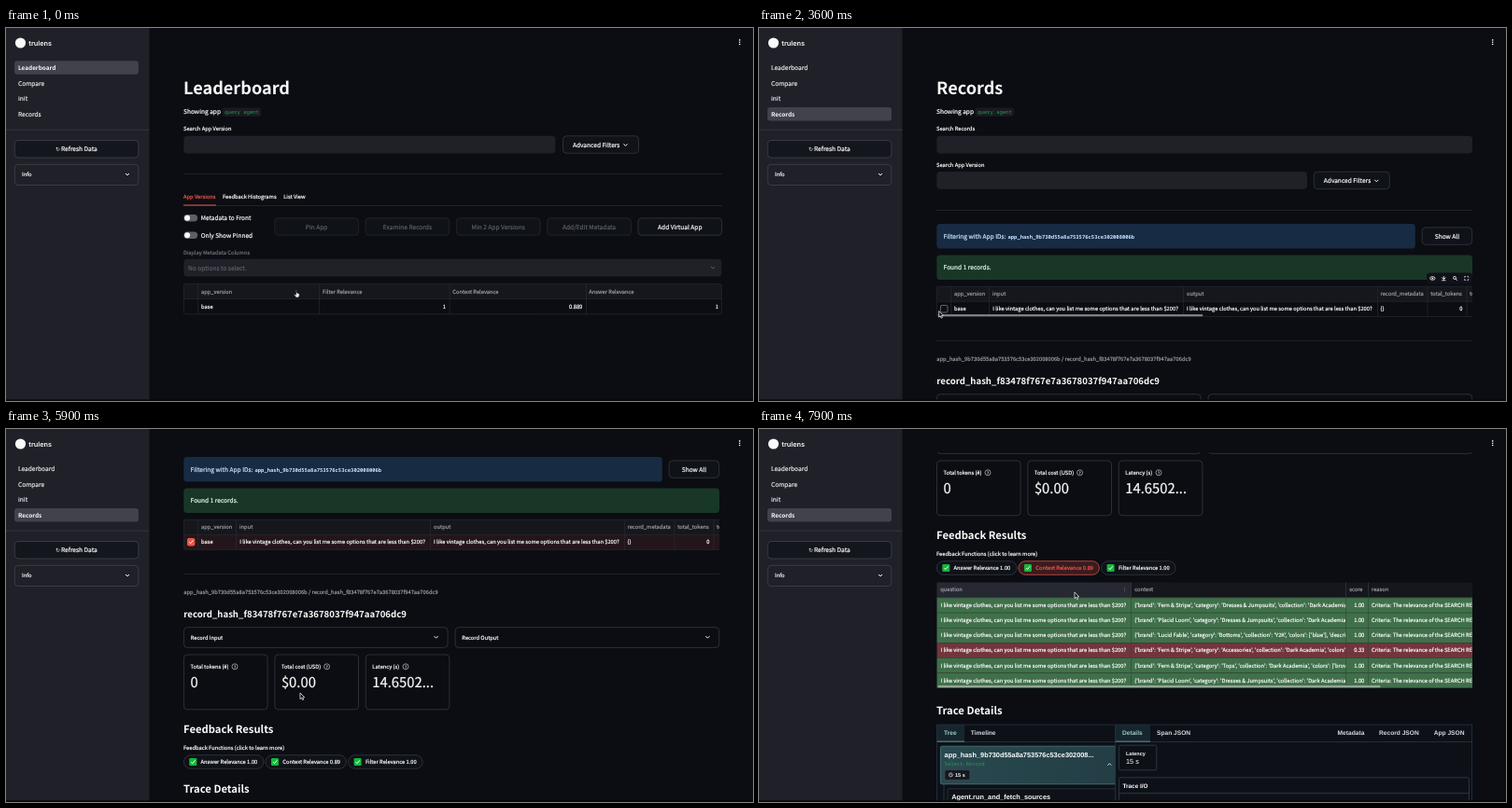
These frames come from a looping animation (800x400 px, 8 s). An HTML page with a canvas:

```html
<!DOCTYPE html>
<html lang="en">
<head>
<meta charset="utf-8">
<title>Records dashboard</title>
<style>
  html, body { margin: 0; width: 100%; height: 100%; overflow: hidden; background: #0b0d12; }
  canvas { display: block; width: 800px; height: 400px; }
</style>
</head>
<body>
<canvas id="stage"></canvas>
<script>
const LOOP = 8000, STEP = 100;
const UNIT = 0.46;              // stage pixels per interface pixel
const SANS = '"Noto Sans CJK JP", "Noto Sans CJK SC", "Noto Sans CJK", "Open Sans", sans-serif';
const SANS_FIT = UNIT / 1.117;  // this family draws its Latin letters large
const MONO = '"Noto Sans Mono", "Liberation Mono", monospace';
const ARIAL = '"Liberation Sans", Arial, sans-serif';

const BG = '#0b0d12', PANEL = '#1f2028', INK = '#fafafa', MUTED = '#989aa2', DIM = '#5c5e66';
const BUTTON = '#0f1218', LINE = '#2a2c34', EDGE = '#3c3e47', RED = '#e8584b', GREEN = '#2c9a4b', TEAL = '#9cc9c6';

const QUESTION = 'I like vintage clothes, can you list me some options that are less than $200?';
const APP_HASH = 'app_hash_9b730d55a8a753576c53ce302008006b';
const RECORD_HASH = 'record_hash_f83478f767e7a3678037f947aa706dc9';

const canvas = document.getElementById('stage');
const ctx = canvas.getContext('2d');
const ratio = window.devicePixelRatio || 1;
canvas.width = 800 * ratio;
canvas.height = 400 * ratio;

// ---- drawing helpers ----
function write(s, x, y, px, family, color, weight, align) {
  ctx.font = `${weight} ${px}px ${family}`;
  ctx.fillStyle = color;
  ctx.textAlign = align;
  ctx.fillText(s, x, y);
}
function text(s, x, y, size = 14, color = INK, weight = 400, align = 'left') {
  write(s, x, y, size * SANS_FIT, SANS, color, weight, align);
  if (weight > 400) return;
  // a hairline outline gives the regular weight its heavier screen look
  ctx.strokeStyle = color;
  ctx.lineWidth = 0.2;
  ctx.strokeText(s, x, y);
}
const mono = (s, x, y, color = GREEN, weight = 400) =>
  write(s, x, y, 12 * UNIT, MONO, color, weight, 'left');
const arial = (s, x, y, size, color = INK, weight = 700) =>
  write(s, x, y, size * UNIT, ARIAL, color, weight, 'left');

function rect(x, y, w, h, color) {
  ctx.fillStyle = color;
  ctx.fillRect(x, y, w, h);
}
function box(x, y, w, h, r, fill, edge) {
  ctx.beginPath();
  ctx.roundRect(x, y, w, h, r);
  if (fill) { ctx.fillStyle = fill; ctx.fill(); }
  if (edge) { ctx.strokeStyle = edge; ctx.lineWidth = 0.7; ctx.stroke(); }
}
function path(points, color, width = 1) {
  ctx.beginPath();
  points.forEach(([x, y], i) => i ? ctx.lineTo(x, y) : ctx.moveTo(x, y));
  ctx.strokeStyle = color;
  ctx.lineWidth = width;
  ctx.stroke();
}
function dot(x, y, r, color) {
  ctx.beginPath();
  ctx.arc(x, y, r, 0, 7);
  ctx.fillStyle = color;
  ctx.fill();
}
function ring(x, y, r, color, width = 0.8) {
  ctx.beginPath();
  ctx.arc(x, y, r, 0, 7);
  ctx.strokeStyle = color;
  ctx.lineWidth = width;
  ctx.stroke();
}
function clipped(x, y, w, h, draw) {
  ctx.save();
  ctx.beginPath();
  ctx.rect(x, y, w, h);
  ctx.clip();
  draw();
  ctx.restore();
}
const rule = (y, right = 764) => rect(190, y - 0.35, right - 190, 0.7, LINE);
const chevron = (x, y, color = INK, dir = 1) =>
  path([[x - 2, y - dir], [x, y + dir], [x + 2, y - dir]], color, 1);
const kebab = (x, y, gap, r, color) => [-gap, 0, gap].forEach(d => dot(x, y + d, r, color));
const tick = (x, y, color) => path([[x - 2, y], [x - 0.6, y + 1.6], [x + 2.2, y - 1.8]], color, 1);

function checkbox(x, y, state) {
  if (state === 'empty') return box(x - 3.8, y - 3.8, 7.6, 7.6, 1.6, null, '#8a8c94');
  box(x - 4.2, y - 4.2, 8.4, 8.4, 1.8, state === 'all' ? '#c8cad0' : RED);
  tick(x, y, state === 'all' ? '#24262e' : INK);
}
function button(label, x, y, w, h = 18.5, on = true) {
  box(x, y, w, h, 3.7, BUTTON, on ? EDGE : LINE);
  text(label, x + w / 2, y + h / 2 + 2.6, 16, on ? INK : DIM, 400, 'center');
}
function advancedFilters(x, y) {
  box(x, y, 81, 18.5, 3.7, BUTTON, EDGE);
  text('Advanced Filters', x + 10.5, y + 12, 16);
  chevron(x + 67, y + 9.6);
}
const input = (x, y, w) => box(x, y, w, 18.7, 3.7, PANEL);

// ---- timing helpers ----
function along(keys, t) {
  const next = keys.findIndex(([at]) => at > t);
  if (next === 0) return keys[0].slice(1);
  if (next < 0) return keys[keys.length - 1].slice(1);
  const a = keys[next - 1], b = keys[next];
  const p = (t - a[0]) / (b[0] - a[0]);
  const e = p * p * (3 - 2 * p);
  return a.slice(1).map((v, k) => v + (b[k + 1] - v) * e);
}
const between = (t, a, b) => t >= a && t < b;

const POINTER = [
  [0, 310.5, 281], [100, 310, 281], [500, 199, 297], [1200, 199, 297], [1700, 420, 219.5],
  [1900, 424, 214], [2500, 424, 214], [3300, 195, 307], [3600, 192.7, 303.5], [3900, 198, 300],
  [4300, 198, 300], [4900, 317, 285.5], [5200, 317, 285.5], [5900, 315, 283], [6100, 315, 282],
  [6400, 319, 207], [6800, 329, 147], [7500, 330, 147], [7900, 338, 175]
];
const SCROLL = [[5000, 0], [5200, 36.5], [5700, 180], [6000, 180], [6200, 388]];

// ---- sidebar ----
function sidebar(page) {
  rect(0, 0, 153.5, 400, PANEL);
  dot(15.5, 16, 5.6, INK);
  write('trulens', 24.3, 19, 7.3, 'Inter, sans-serif', INK, 600, 'left');
  ['Leaderboard', 'Compare', 'init', 'Records'].forEach((name, i) => {
    const y = 42.4 + i * 16.6, on = name === page;
    if (on) box(9, y - 7.1, 133, 14.4, 3, '#40424c');
    text(name, 13, y + 2.7, on ? 15.6 : 16, on ? INK : '#e4e5e8', on ? 700 : 400);
  });
  rect(0, 108.8, 153.5, 0.7, '#3d3e47');
  box(9.3, 120.5, 132.5, 18.5, 3.7, '#14161d', '#464852');
  write('↻', 53, 132, 6, '"DejaVu Sans", sans-serif', INK, 400, 'left');
  text('Refresh Data', 59, 132.4, 16);
  box(9.3, 146.3, 132.5, 22.2, 3.7, PANEL, '#464852');
  text('Info', 17, 159.4);
  chevron(130, 157);
}

function pageTop(title, label) {
  text(title, 190, 71.3, 44, INK, 700);
  text('Showing app', 190, 92.2, 16);
  box(232, 85.5, 41, 9.3, 1.8, '#181b22');
  mono('query agent', 234.3, 92);
  text(label, 190, 110.2);
}

// ---- leaderboard page ----
function leaderboard(t) {
  const picked = t >= 1000;
  pageTop('Leaderboard', 'Search App Version');
  input(190.3, 115.7, 398);
  advancedFilters(596.5, 115.8);
  rule(156.3, 766.5);

  text('App Versions', 190, 183, 14, RED);
  text('Feedback Histograms', 232, 183);
  text('List View', 297.2, 183);
  rule(190.4, 766.5);
  rect(190, 189.5, 35, 1, RED);

  ['Metadata to Front', 'Only Show Pinned'].forEach((label, i) => {
    const y = 203.8 + i * 18.5;
    box(190.4, y - 3.7, 14.8, 7.4, 3.7, '#5d5f67');
    dot(194.1, y, 3, INK);
    text(label, 208.7, y + 2.6, 15.8);
  });
  ['Pin App', 'Examine Records', 'Min 2 App Versions', 'Add/Edit Metadata', 'Add Virtual App']
    .forEach((label, i) => button(label, 287.8 + i * 97.3, 203.9, 89.6, 18.3, i === 4 || (picked && i !== 2)));
  if (between(t, 1800, 2200)) {
    box(385.1, 203.9, 89.6, 18.3, 3.7, BUTTON, RED);
    text('Examine Records', 429.9, 215.7, 16, RED, 400, 'center');
  }

  text('Display Metadata Columns', 190, 242.6, 14, '#6c6e76');
  box(190.3, 247.8, 576, 18.6, 3.7, PANEL);
  text('No options to select.', 195, 259.8, 16, DIM);
  chevron(757, 257, DIM);

  rect(190.4, 274.4, 576, 16.2, '#15171d');
  rect(190.4, 290.6, 576, 16.2, picked ? '#23161a' : BG);
  box(190.4, 274.4, 576, 32.4, 2, null, LINE);
  rect(190.4, 290.3, 576, 0.6, LINE);
  [205.5, 335.3, 474.8, 621].forEach(x => rect(x, 274.4, 0.6, 32.4, LINE));
  ['app_version', 'Filter Relevance', 'Context Relevance', 'Answer Relevance']
    .forEach((s, i) => text(s, [209, 339, 478.3, 624.3][i], 284.6, 14, MUTED));
  text('base', 209, 300.8);
  ['1', '0.889', '1'].forEach((s, i) => text(s, [471, 617.3, 763][i], 300.8, 14, INK, 400, 'right'));
  if (picked) {
    checkbox(198.2, 282.4, 'all');
    checkbox(198.2, 298.5, 'on');
  } else if (t >= 300) {
    checkbox(198.2, 298.5, 'empty');
  }
}

// ---- records page ----
function toolbar(picked) {
  const left = picked ? 703 : 715;
  box(left, 262.6, 764 - left, 12, 3, BUTTON);
  const y = 268.4;
  if (picked) {
    path([[707.5, y - 1.6], [710.7, y + 1.6]], INK, 0.8);
    path([[710.7, y - 1.6], [707.5, y + 1.6]], INK, 0.8);
  }
  ctx.beginPath();
  ctx.ellipse(721.3, y, 2.7, 1.8, 0, 0, 7);
  ctx.strokeStyle = INK;
  ctx.lineWidth = 0.8;
  ctx.stroke();
  dot(721.3, y, 0.9, INK);
  path([[733.3, y - 2.3], [733.3, y + 0.8]], INK, 0.9);
  chevron(733.3, y + 0.2, INK);
  path([[731.2, y + 2.3], [735.4, y + 2.3]], INK, 0.8);
  ring(745, y - 0.5, 1.5, INK);
  path([[746.1, y + 0.6], [747.8, y + 2.3]], INK, 0.9);
  [[-1, -1], [1, -1], [-1, 1], [1, 1]].forEach(([sx, sy]) => {
    const cx = 757.7 + sx * 2, cy = y + sy * 2;
    path([[cx - sx * 1.3, cy], [cx, cy], [cx, cy - sy * 1.3]], INK, 0.7);
  });
}

function recordTable(t) {
  const picked = t >= 4000, hovered = between(t, 3200, 5500);
  clipped(190, 276.5, 574, 33.5, () => {
    rect(190.4, 277, 574, 16.2, '#15171d');
    if (between(t, 4600, 5500)) {
      rect(246.5, 277, 208, 16.2, '#262832');
      kebab(447.2, 285, 1.7, 0.45, MUTED);
    }
    rect(190.4, 293.2, 574, 16.2, picked ? '#23161a' : BG);
    box(190.4, 277, 580, 32.4, 2, null, LINE);
    rect(190.4, 292.9, 574, 0.6, LINE);
    [205.5, 246.4, 454.4, 662, 715.7, 757.7].forEach(x => rect(x, 277, 0.6, 32.4, LINE));
    ['app_version', 'input', 'output', 'record_metadata', 'total_tokens', 'total_cost']
      .forEach((s, i) => text(s, [209, 250, 458, 665.5, 719.2, 761][i], 287.3, 14, MUTED));
    text('base', 209, 303.4);
    text(QUESTION, 250.2, 303.4);
    text(QUESTION, 458, 303.4);
    text('{}', 665.5, 303.4);
    text('0', 753.5, 303.4, 14, INK, 400, 'right');
    if (picked || hovered) checkbox(198.2, 301.2, picked ? 'on' : 'empty');
    if (hovered) box(191.5, 306.9, 284, 2.3, 1.1, '#7d7f86');
  });
  if (hovered) toolbar(picked);
}

function pill(label, x, w, on) {
  box(x, 529.7, w, 14.6, 7.3, on ? '#3a1b1f' : BUTTON, on ? RED : EDGE);
  box(x + 6, 533, 8, 8, 1.2, '#12b83a');
  tick(x + 10, 537.1, INK);
  text(label, x + 18.3, 539.2, 14, on ? RED : INK);
}

function feedbackTable(t) {
  const items = [
    ['Fern & Stripe', 'Dresses & Jumpsuits'], ['Placid Loom', 'Dresses & Jumpsuits'],
    ['Lucid Fable', 'Bottoms', 'Y2K', 'blue'], ['Fern & Stripe', 'Accessories'],
    ['Fern & Stripe', 'Tops'], ['Placid Loom', 'Dresses & Jumpsuits']
  ];
  const columns = [190.5, 398.4, 628.4, 652.2, 764], top = 552.6, row = 16.15;
  clipped(190, top - 0.5, 574, 114.5, () => {
    rect(190.5, top, 574, row, '#15171d');
    if (t >= 7800) {
      rect(190.5, top, 208, row, '#262832');
      kebab(391.3, 560.2, 1.7, 0.45, MUTED);
    }
    ['question', 'context', 'score', 'reason'].forEach((s, i) => text(s, columns[i] + 3.8, 562.4, 14, MUTED));
    items.forEach(([brand, category, style = 'Dark Academia', color = 'brown'], i) => {
      const y = top + row * (i + 1), low = i === 3, base = y + 10.2;
      rect(190.5, y, 574, row, low ? '#72353c' : '#40704a');
      rect(190.5, y, 574, 0.6, '#2f4737');
      text(QUESTION, 194.5, base);
      clipped(columns[1], y, 230, row, () =>
        text(`{'brand': '${brand}', 'category': '${category}', 'collection': '${style}', ` +
          `'colors': ['${color}'], 'description'`, 402.2, base));
      text(low ? '0.33' : '1.00', 648.3, base, 14, INK, 400, 'right');
      text('Criteria: The relevance of the SEARCH RESULT', 656, base);
    });
    columns.slice(1, 4).forEach(x => rect(x, top, 0.6, 114, '#2f4737'));
    box(191.5, 663, 474, 2.3, 1.1, '#93a896');
  });
}

function treeItem(x, y, title, selector, time, style = {}) {
  const fill = ctx.createLinearGradient(x, y, 381, y + 40);
  fill.addColorStop(0, style.from || '#0e1218');
  fill.addColorStop(1, style.to || '#0e1218');
  box(x, y, 383 - x, 40.6, 1.5, fill, style.edge || '#2b3a45');
  arial(title, x + 4.2, y + 11.6, 16);
  mono(selector, x + 4.2, y + 20.4);
  box(x + 4.5, y + 25.2, time.length * 3 + 15, 11, 2, '#15181e', '#4a4d55');
  ring(x + 11, y + 30.7, 2, INK, 0.6);
  path([[x + 11, y + 29.4], [x + 11, y + 30.8], [x + 12, y + 31.2]], INK, 0.5);
  arial(time, x + 15.6, y + 32.7, 12);
  if (style.open) chevron(375.3, y + 19.5, '#cfd3d6', -1);
}

function trace(t) {
  const hot = between(t, 6200, 6600), frame = '#263a52';
  text('Trace Details', 190, 569.6, 27.4, INK, 700);
  rect(190.5, 580.5, 573, 300, '#0d1117');
  rect(190.5, 580.5, 29.5, 18.3, '#17262e');
  rect(381.5, 580.5, 37.5, 18.3, '#17262e');
  rect(190.5, 598.5, 573, 0.7, frame);
  rect(190.5, 598, 29.5, 1, '#5b8e91');
  rect(381.5, 598, 37.5, 1, '#5b8e91');
  ['Tree', 'Timeline', 'Details', 'Span JSON', 'Metadata', 'Record JSON', 'App JSON'].forEach((s, i) =>
    arial(s, [198, 226.8, 389, 426, 619.6, 664, 722.7][i], 591.6, 14.45, i % 2 || i > 2 ? '#d5d8dc' : TEAL));

  clipped(190.5, 599, 191.2, 290, () => {
    path([[198, 644], [198, 669], [202, 669]], '#33454f', 0.7);
    path([[205.5, 689], [205.5, 760], [209, 760]], '#33454f', 0.7);
    path([[205.5, 714.5], [209, 714.5]], '#33454f', 0.7);
    treeItem(194.4, 603.6, 'app_hash_9b730d55a8a753576c53ce302008...', 'Select.Record', '15 s',
      { from: hot ? '#3d6c6c' : '#294a50', to: hot ? '#2b5054' : '#233d45', edge: '#528487', open: true });
    treeItem(202, 649.2, 'Agent.run_and_fetch_sources', 'Select.Record.app.run_and_fetch_sources', '15 s', { open: true });
    treeItem(209.2, 694.5, 'Agent.run', 'Select.Record.app.run', '14 s');
    treeItem(209.2, 739.8, 'Agent.fetch_sources', 'Select.Record.app.fetch_sources', '419 ms');
    box(191.5, 785.7, 182, 3, 1.5, '#6c6e73');
  });
  rect(381.4, 580.5, 0.7, 220, frame);

  box(385.6, 602.6, 40.2, 26.6, 1.5, null, '#33475a');
  arial('Latency', 393, 613, 12);
  arial('15 s', 393, 622.8, 16, INK, 400);
  box(385.6, 637.2, 374.8, 87.4, 1.5, null, '#33475a');
  arial('Trace I/O', 389.4, 648, 14);
  rect(385.6, 653.8, 374.8, 0.7, '#33475a');
  [['Input', 413], ['Output', 418]].forEach(([name, x], i) => {
    const y = 668.9 + i * 31;
    arial(name, 393, y, 14);
    mono('Select.Record' + name, x, y);
    arial(QUESTION, 393, y + 13.6, 16, INK, 400);
  });
  box(190.5, 580.5, 573, 220, 0, null, frame);

  if (between(t, 6300, 6600)) {
    box(247, 651.8, 85, 26, 2, '#47484d', '#63656b');
    [['Selector: ', 'Select.Record'], ['Start: ', '4/16/2025 10:39:57.767397'], ['End: ', '4/16/2025 10:40:12.417620']]
      .forEach(([label, value], i) => {
        const y = 658.5 + i * 7.7;
        arial(label, 251, y, 11);
        arial(value, 251 + ctx.measureText(label).width, y, 11, INK, 400);
      });
  }
}

function records(t) {
  pageTop('Records', 'Search Records');
  input(190.3, 115.7, 573.7);
  text('Search App Version', 190, 149);
  input(190.3, 154.1, 396.7);
  advancedFilters(594.3, 154.2);
  rule(195.3);

  box(190.3, 210, 512.5, 26.6, 3.7, '#172b43');
  text('Filtering with App IDs: ', 197.6, 225.8, 16, '#c7e4ff');
  mono(APP_HASH, 266.5, 225.6, '#c7e4ff', 700);
  button('Show All', 710.2, 213.9, 53.4, 18.4);
  box(190.3, 243.5, 573.7, 26.5, 3.7, '#193726');
  text('Found 1 records.', 197.6, 259, 16, '#dffde9');
  recordTable(t);
  rule(335.6);

  text(`${APP_HASH} / ${RECORD_HASH}`, 190.3, 357.4, 14, MUTED);
  text(RECORD_HASH, 190.3, 382.4, 23.3, INK, 700);
  [['Record Input', 190.5, 460.6], ['Record Output', 481.1, 751.4]].forEach(([label, x, arrow]) => {
    box(x, 392.7, 282.6, 21.7, 3.7, null, EDGE);
    text(label, x + 7.2, 405.7);
    chevron(arrow, 403.2);
  });
  [['Total tokens (#)', '0', 245], ['Total cost (USD)', '$0.00', 343.6], ['Latency (s)', '14.6502...', 428]]
    .forEach(([label, value, help], i) => {
      const x = 190.5 + i * 97.4;
      box(x, 422, 89.6, 58.8, 3.7, null, EDGE);
      text(label, x + 7, 437.2);
      ring(help, 434.8, 3, '#c4c6cb', 0.7);
      text('?', help, 436.7, 11, '#c4c6cb', 400, 'center');
      text(value, x + 7, 457.3, 36);
    });

  text('Feedback Results', 190, 505.8, 27.4, INK, 700);
  text('Feedback Functions (click to learn more)', 190, 524.2);
  pill('Answer Relevance 1.00', 190.3, 85.8, false);
  pill('Context Relevance 0.89', 278, 86.4, t >= 7000);
  pill('Filter Relevance 1.00', 366.6, 79.6, false);

  const open = t >= 7400;
  if (open) feedbackTable(t);
  ctx.save();
  if (open) ctx.translate(0, 124.6);
  trace(t);
  ctx.restore();
}

// ---- pointer ----
function pointer(t) {
  const [x, y] = along(POINTER, t);
  const hand = t < 200 || between(t, 600, 1300) || between(t, 1800, 2600) ||
    between(t, 3800, 4400) || between(t, 6700, 7700);
  ctx.save();
  ctx.translate(x, y);
  const shape = hand
    ? [[-0.2, 0.6], [0.9, 0.6], [1.1, 3], [3.8, 3.9], [3.6, 6.5], [2.8, 8], [0, 8], [-1.9, 5], [-1.2, 4.3], [0, 5.2]]
    : [[0, 0], [0, 6.6], [1.5, 5.3], [2.5, 7.6], [3.7, 7.1], [2.7, 4.9], [4.7, 4.8]];
  ctx.beginPath();
  shape.forEach(p => ctx.lineTo(...p));
  ctx.closePath();
  ctx.fillStyle = hand ? '#fff' : '#08090c';
  ctx.strokeStyle = hand ? '#14161b' : '#e9e9ec';
  ctx.lineWidth = 0.8;
  ctx.lineJoin = 'round';
  ctx.fill();
  ctx.stroke();
  ctx.restore();
}

function frame() {
  const t = Math.floor(performance.now() % LOOP / STEP) * STEP;
  const onRecords = t >= 2200;
  ctx.setTransform(ratio, 0, 0, ratio, 0, 0);
  ctx.textRendering = 'geometricPrecision';
  ctx.lineJoin = 'round';
  rect(0, 0, 800, 400, BG);
  clipped(153.5, 25, 646.5, 375, () => {
    ctx.translate(0, -along(SCROLL, t)[0]);
    (onRecords ? records : leaderboard)(t);
  });
  sidebar(onRecords ? 'Records' : 'Leaderboard');
  kebab(785.7, 15.2, 2.3, 0.8, INK);
  rect(0, 398.4, 800, 1.6, '#07080b');
  pointer(t);
  requestAnimationFrame(frame);
}
frame();
</script>
</body>
</html>
```
